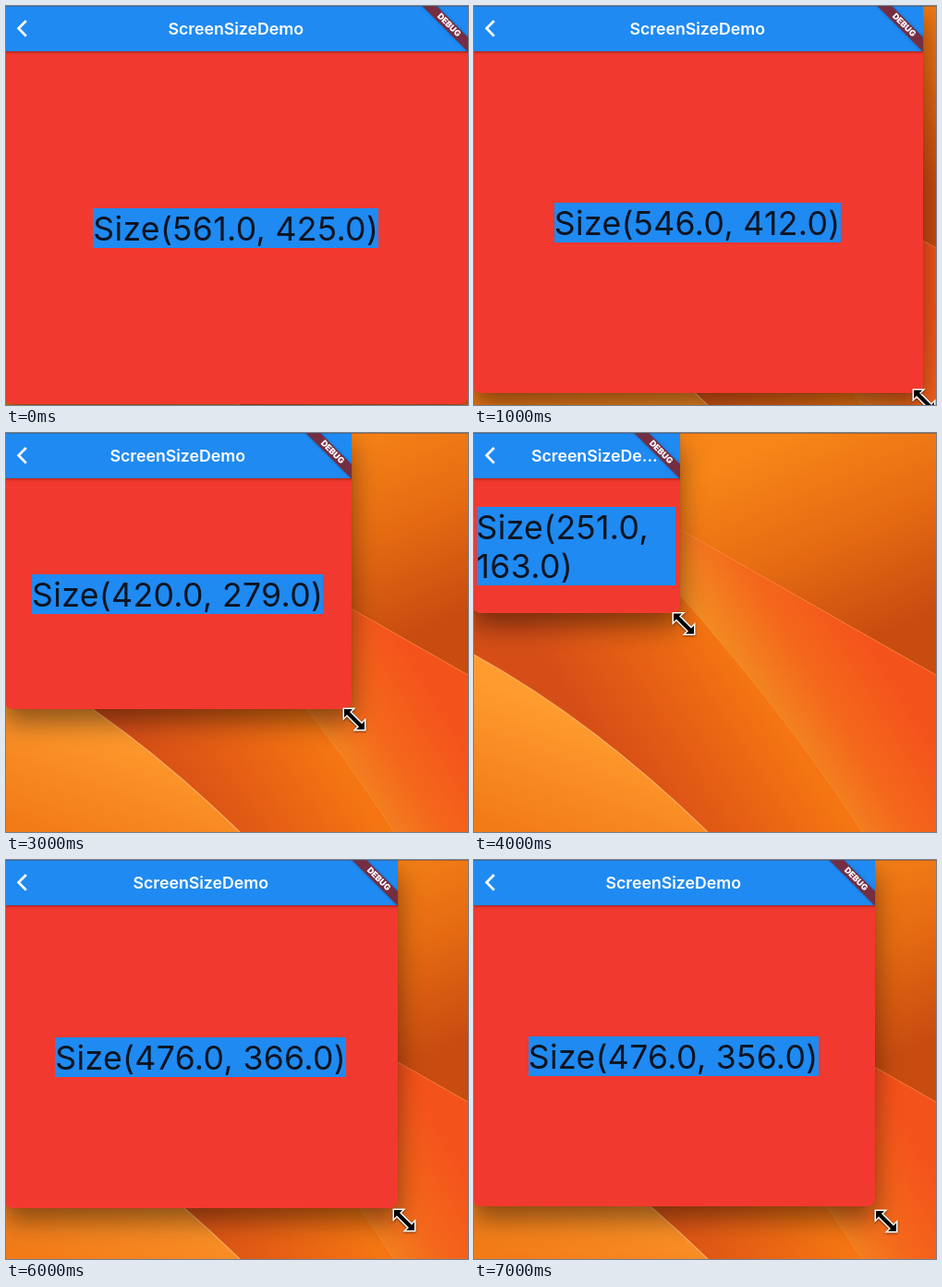
Animation of 500 by 432 pixels, one loop 8000 ms. Source, as an HTML page:

```html
<!DOCTYPE html>
<html lang="en">
<head>
<meta charset="utf-8">
<title>ScreenSizeDemo</title>
<style>
  html, body { margin: 0; width: 100%; height: 100%; overflow: hidden; }
  body { position: relative; font-family: Inter, "Open Sans", sans-serif; background: #e8701a; }
  #stage { position: absolute; left: 0; top: 0; width: 500px; height: 432px; overflow: hidden; }
  #stage > svg { position: absolute; left: 0; top: 0; }
  #win {
    position: absolute; left: -2.5px; top: 0;
    border-radius: 0 0 9px 9px;
    box-shadow: 0 0 1px rgba(0,0,0,.35), 0 14px 28px rgba(0,0,0,.45);
  }
  #clip { position: absolute; inset: 0; overflow: hidden; border-radius: inherit; background: #f2392f; }
  #bar {
    position: absolute; left: 0; right: 0; top: 0; height: 49px;
    background: #1f8af2; box-shadow: 0 1px 3px rgba(0,0,0,.4);
  }
  #bar svg { position: absolute; left: 2.5px; top: 0; }
  #title {
    position: absolute; top: 13.5px; line-height: 22px;
    font-size: 17.8px; font-weight: 600; letter-spacing: -.05px; color: #fff;
    white-space: nowrap; overflow: hidden; text-overflow: ellipsis;
  }
  #body {
    position: absolute; left: 5px; right: 5px; top: 50px; bottom: 0;
    display: flex; align-items: center; justify-content: center;
  }
  #box { background: #1f8af2; }
  #label {
    position: relative; top: 1.5px; color: #0d1420;
    font-size: 35.6px; line-height: 42.4px; letter-spacing: .35px;
  }
  #ribbon { position: absolute; left: 100%; top: 0; transform: rotate(45deg); }
  #ribbon span {
    position: absolute; left: -35.6px; top: 24px; width: 71.2px; height: 10.7px;
    background: #752d42; box-shadow: 0 0 3px rgba(0,0,0,.35);
    color: #fff; font-size: 9.1px; font-weight: 900; line-height: 10.7px; text-align: center;
  }
  #edge { position: absolute; left: 0; top: 0; width: 100%; height: 1px; background: rgba(70,70,70,.4); }
  #cursor { filter: drop-shadow(0 1px 1px rgba(0,0,0,.5)); }
</style>
</head>
<body>
<div id="stage">
  <svg width="500" height="432" viewBox="0 0 500 432">
    <defs>
      <linearGradient id="sky" gradientUnits="userSpaceOnUse" x1="330" y1="10" x2="425" y2="225">
        <stop offset="0" stop-color="#f78518"/>
        <stop offset=".5" stop-color="#e66c12"/>
        <stop offset="1" stop-color="#c84c10"/>
      </linearGradient>
      <linearGradient id="band" gradientUnits="userSpaceOnUse" x1="305" y1="295" x2="460" y2="200">
        <stop offset="0" stop-color="#f28a22"/>
        <stop offset=".38" stop-color="#f4681b"/>
        <stop offset=".8" stop-color="#f4521b"/>
      </linearGradient>
      <linearGradient id="slope" gradientUnits="userSpaceOnUse" x1="125" y1="320" x2="270" y2="225">
        <stop offset="0" stop-color="#d64e17"/>
        <stop offset=".5" stop-color="#e66014"/>
        <stop offset="1" stop-color="#f47512"/>
      </linearGradient>
      <linearGradient id="dune" gradientUnits="userSpaceOnUse" x1="95" y1="300" x2="45" y2="432">
        <stop offset="0" stop-color="#ff9b2f"/>
        <stop offset="1" stop-color="#f27b18"/>
      </linearGradient>
    </defs>
    <rect width="500" height="432" fill="url(#sky)"/>
    <path d="M180 80L500 262V432H180Z" fill="url(#band)"/>
    <path d="M0 80H180V128Q325 285 420 432H0Z" fill="url(#slope)"/>
    <path d="M0 240Q130 312 253 432H0Z" fill="url(#dune)"/>
    <g fill="none" stroke="#ffbe70">
      <path d="M180 80L500 262" stroke="#ff8a40" stroke-opacity=".8"/>
      <path d="M180 128Q325 285 420 432" stroke-opacity=".2"/>
      <path d="M0 240Q130 312 253 432" stroke-width="1.3" stroke-opacity=".75"/>
    </g>
  </svg>
  <div id="win">
    <div id="clip">
      <div id="body"><div id="box"><div id="label"></div></div></div>
      <div id="bar">
        <svg width="40" height="49"><path d="M21.8 16L13.6 24.3L21.8 32.6" fill="none" stroke="#fff" stroke-width="2.7"/></svg>
        <div id="title">ScreenSizeDemo</div>
      </div>
      <div id="ribbon"><span>DEBUG</span></div>
    </div>
  </div>
  <div id="edge"></div>
  <svg id="cursor" width="500" height="432">
    <path id="arrow" d="M-11-11H-2L-5-8L8 5L11 2V11H2L5 8L-8-5L-11-2Z"
      fill="#000" stroke="#fff" stroke-width="3" paint-order="stroke"/>
  </svg>
</div>
<script>
  const STEP = 1000;
  // window right, window bottom, reported width and height, cursor x and y
  const steps = [
    [500, 431, 561, 425],
    [486, 419, 546, 412, 487, 427],
    [472, 406, 531, 399, 472, 414],
    [374, 299, 420, 279, 377, 310],
    [223, 195, 251, 163, 227, 206.5],
    [413, 379, 464, 368, 417, 390],
    [424, 377, 476, 366, 431, 390],
    [434, 375, 476, 356, 446, 391]
  ];
  const $ = id => document.getElementById(id);
  const win = $('win'), title = $('title'), label = $('label'), arrow = $('arrow');
  const BAR_START = 64.5, BAR_END = 22;
  let shown = -1;

  function layout([right, bottom, w, h, x, y]) {
    const width = right + 2.5;
    win.style.width = width + 'px';
    win.style.height = bottom + 'px';
    label.textContent = `Size(${w.toFixed(1)}, ${h.toFixed(1)})`;
    title.style.maxWidth = width - BAR_START - BAR_END + 'px';
    const left = (width - title.getBoundingClientRect().width) / 2;
    title.style.left = Math.max(BAR_START, left) + 'px';
    arrow.style.display = x ? '' : 'none';
    if (x) arrow.setAttribute('transform', `translate(${x} ${y})`);
  }

  function tick() {
    const i = Math.floor(performance.now() / STEP) % steps.length;
    if (i !== shown) layout(steps[shown = i]);
    requestAnimationFrame(tick);
  }
  tick();
</script>
</body>
</html>
```
